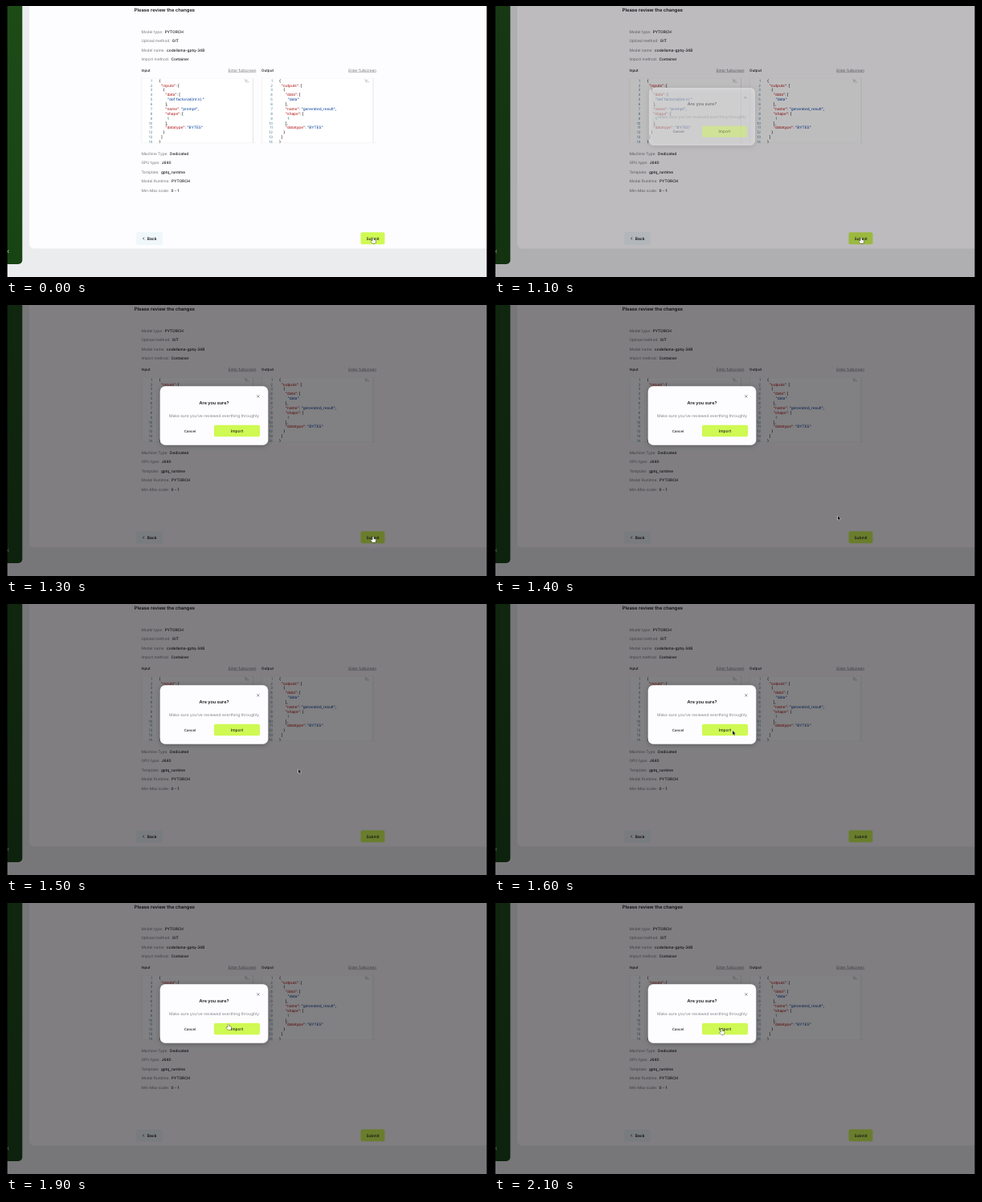
Recreate the animation shown at these times as an HTML page with a canvas. Size 600 by 338 pixels, loop 3.1 s.

```html
<!DOCTYPE html>
<html lang="en">
<head>
<meta charset="utf-8">
<title>Review and import</title>
<style>
html, body { margin: 0; width: 100%; height: 100%; overflow: hidden; background: #000; }
canvas { display: block; width: 600px; height: 338px; }
</style>
</head>
<body>
<canvas id="stage"></canvas>
<script>
const W = 600, H = 338, LOOP = 3100, STEP = 100;
const canvas = document.getElementById('stage');
const ctx = canvas.getContext('2d');
const dpr = window.devicePixelRatio || 1;
canvas.width = W * dpr;
canvas.height = H * dpr;
ctx.textRendering = 'geometricPrecision';

const INK = '#17171b', GREY = '#77777d', LIME = '#cff953', PANEL = '#fdfcfe';

// [time, x, y] of the pointer tip
const PATH = [
  [1300, 457, 289], [1400, 428, 263], [1500, 364, 206], [1600, 297, 158],
  [1700, 271, 143], [1800, 272, 145], [1900, 277, 151], [2000, 282, 156], [2100, 283.5, 157]
];
// [time, dimming, dialog opacity, dialog scale]
const FADE = [
  [1000, 0, 0, 0.96], [1100, 0.26, 0.46, 0.982], [1200, 0.45, 0.95, 0.998], [1300, 0.5, 1, 1]
];

const CODE = (list, text, name) => [
  '{', `"${list}": [`, '{', '"data": [', `"${text}"`, '],', `"name": "${name}",`,
  '"shape": [', '1', '],', '"datatype": "BYTES"', '}', ']', '}'
];
const INDENT = [0, 1, 2, 3, 4, 3, 3, 3, 4, 3, 3, 2, 1, 0];

const DETAILS = [
  [32, 'Model type:', 'PYTORCH'],
  [43.5, 'Upload method:', 'GIT'],
  [55, 'Model name:', 'codellama-gptq-34B'],
  [66.5, 'Import method:', 'Container'],
  [184, 'Machine Type:', 'Dedicated'],
  [195.5, 'GPU type:', 'J640'],
  [207, 'Template:', 'gptq_runtime'],
  [218.5, 'Model Runtime:', 'PYTORCH'],
  [230, 'Min-Max scale:', '0 - 1']
];

function sample(keys, t) {
  if (t <= keys[0][0]) return keys[0].slice(1);
  for (let i = 1; i < keys.length; i++) {
    const a = keys[i - 1], b = keys[i];
    if (t <= b[0]) {
      const k = (t - a[0]) / (b[0] - a[0]);
      return a.slice(1).map((v, j) => v + (b[j + 1] - v) * k);
    }
  }
  return keys[keys.length - 1].slice(1);
}

// Text centred vertically on y; returns its width
function text(str, x, y, size, color = INK, weight = 400, align = 'left') {
  ctx.font = `${weight} ${size}px Inter, sans-serif`;
  ctx.textAlign = align;
  ctx.fillStyle = color;
  ctx.fillText(str, x, y + size * 0.36);
  return ctx.measureText(str).width;
}

function box(x, y, w, h, r, color) {
  ctx.fillStyle = color;
  ctx.beginPath();
  ctx.roundRect(x, y, w, h, r);
  ctx.fill();
}

function line(points, color, width) {
  ctx.strokeStyle = color;
  ctx.lineWidth = width;
  ctx.beginPath();
  points.forEach(([x, y]) => ctx.lineTo(x, y));
  ctx.stroke();
}

function tokenColor(token, rest) {
  if (token[0] === '"') return rest[0] === ':' ? '#b52b2b' : '#1f55a5';
  return /\d/.test(token) ? '#168a68' : INK;
}

function codeLine(str, x, y) {
  const parts = str.match(/"[^"]*"|\d+|[^"\d]+/g);
  parts.forEach((part, i) => {
    x += text(part, x, y, 4.7, tokenColor(part, parts[i + 1] || ''), 500);
  });
}

function editor(x, label, lines) {
  text(label, x, 80, 4.6, INK, 500);
  const right = x + 143;
  const w = text('Enter fullscreen', right, 80, 4.7, GREY, 400, 'right');
  line([[right - w, 82.7], [right, 82.7]], GREY, 0.45);

  ctx.save();
  ctx.beginPath();
  ctx.rect(x, 90, 144, 81.3);
  ctx.clip();
  ctx.fillStyle = '#fff';
  ctx.fillRect(x, 90, 139, 82);
  lines.forEach((str, i) => {
    const y = 93 + i * 5.88;
    text(String(i + 1), x + 14, y, 4.5, '#4d829b', 400, 'right');
    codeLine(str, x + 22 + INDENT[i] * 2.6, y);
  });
  // Minimap
  [[0, 1], [1, 4], [2, 2], [3, 5]].forEach(([row, len]) => {
    const y = 91.5 + row * 1.1;
    line([[x + 128.5 + row * 0.3, y], [x + 128.5 + row * 0.3 + len, y]], '#9c9ca4', 0.5);
  });
  line([[x + 0.3, 90], [x + 0.3, 171]], '#e2e2e8', 0.6);
  line([[x + 139, 90], [x + 139, 171]], '#dcdce2', 0.7);
  line([[x, 90.3], [x + 139, 90.3]], '#ececf0', 0.5);
  line([[x, 171], [x + 143, 171]], '#e2e2e8', 0.5);
  ctx.restore();
}

function page() {
  ctx.fillStyle = '#ebecee';
  ctx.fillRect(0, 0, W, H);
  box(29, -10, 590, 312.5, 6, PANEL);

  const green = ctx.createLinearGradient(0, 0, 0, 322);
  green.addColorStop(0, '#1d4b18');
  green.addColorStop(1, '#184414');
  box(-10, -10, 30.3, 332, 5, green);
  line([[3.3, 304.6], [1.8, 306.2], [3.3, 307.8]], '#fff', 0.8);

  text('Please review the changes', 159.7, 5.3, 5.85, INK, 600);
  DETAILS.forEach(([y, label, value]) => {
    const w = text(label, 168.4, y, 4.8, GREY);
    text(value, 168.4 + w + 2.3, y, 4.75, INK, 500);
  });
  editor(168.4, 'Input', CODE('inputs', 'def factorial(int n):', 'prompt'));
  editor(318, 'Output', CODE('outputs', 'data', 'generated_result'));

  box(162, 282, 33, 16, 2.5, '#eff7fa');
  line([[171.9, 288.5], [170.5, 290], [171.9, 291.5]], INK, 0.7);
  text('Back', 175.8, 290, 4.9, INK, 600);
  box(441.5, 282.3, 30, 15, 2, LIME);
  text('Submit', 456.5, 290, 4.8, INK, 500, 'center');
}

function dialog(alpha, scale) {
  if (!alpha) return;
  ctx.save();
  ctx.globalAlpha = alpha;
  ctx.translate(259, 138);
  ctx.scale(scale, scale);
  ctx.translate(-259, -138);
  ctx.shadowColor = 'rgba(0,0,0,0.28)';
  ctx.shadowBlur = 6 * dpr;
  ctx.shadowOffsetY = dpr;
  box(191.7, 101.3, 134.6, 73.4, 6.5, PANEL);
  ctx.shadowColor = 'transparent';
  line([[312.4, 112.3], [315.4, 115.5]], '#55555c', 0.6);
  line([[315.4, 112.3], [312.4, 115.5]], '#55555c', 0.6);
  text('Are you sure?', 259, 122.2, 5.55, INK, 600, 'center');
  text("Make sure you've reviewed everthing throughly", 259, 138, 5, '#85858c', 400, 'center');
  text('Cancel', 229, 157, 4.35, INK, 500, 'center');
  box(259, 149.8, 57, 14.5, 2, LIME);
  text('Import', 287.5, 157, 4.9, INK, 500, 'center');
  ctx.restore();
}

function pointer(x, y, hand) {
  ctx.save();
  ctx.translate(x, y);
  ctx.lineJoin = 'round';
  const shape = new Path2D(hand
    ? 'M-.7 .5Q0-.4 .7 .5V2.7L2.9 3.2Q3.6 3.5 3.4 4.4L2.7 7H-.8L-2.7 4.4Q-2.5 3.3-1.6 3.9L-.7 4.6Z'
    : 'M0 0V5L1.2 4L2 5.9L2.9 5.5L2.1 3.7L3.6 3.6Z');
  ctx.lineWidth = hand ? 0.8 : 0.9;
  ctx.strokeStyle = hand ? '#222226' : '#fff';
  ctx.fillStyle = hand ? '#fff' : '#101012';
  ctx.stroke(shape);
  ctx.fill(shape);
  ctx.restore();
}

function draw(t) {
  const [dim, alpha, scale] = sample(FADE, t);
  const [x, y] = sample(PATH, t);
  ctx.setTransform(dpr, 0, 0, dpr, 0, 0);
  page();
  ctx.fillStyle = `rgba(4,2,6,${dim})`;
  ctx.fillRect(0, 0, W, H);
  dialog(alpha, scale);
  const overSubmit = t < 1400;
  const overImport = x > 259 && x < 316 && y > 150 && y < 164;
  pointer(x, y, overSubmit || (t > 1700 && overImport));
  ctx.fillStyle = '#000';
  ctx.fillRect(0, 0, 1.7, H);
  ctx.fillRect(598.4, 0, 1.6, H);
}

const start = performance.now();
function tick() {
  const t = (performance.now() - start) % LOOP;
  draw(Math.floor(t / STEP) * STEP);
  requestAnimationFrame(tick);
}
tick();
</script>
</body>
</html>
```
